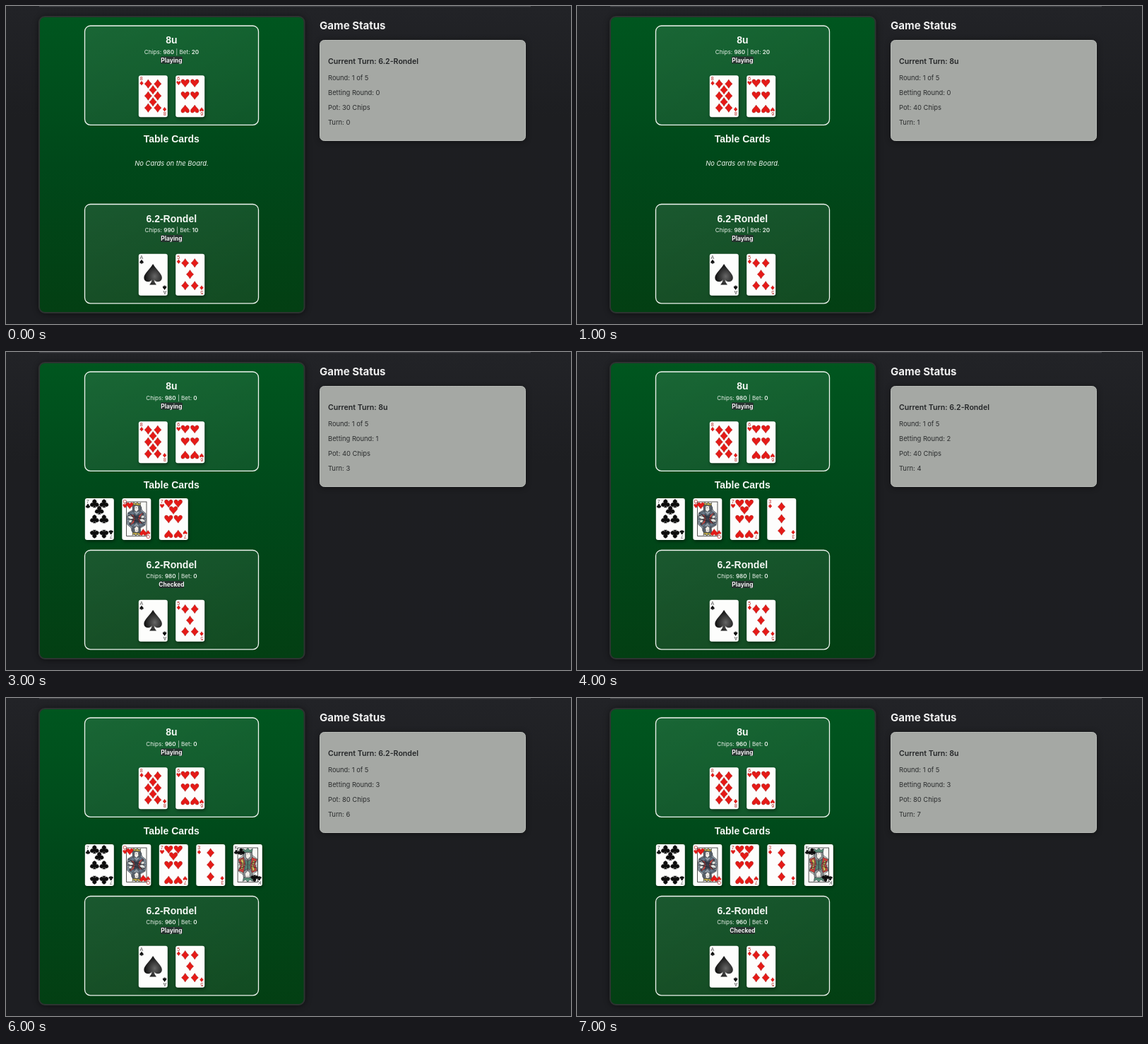
These frames come from a looping animation (800 by 450 pixels, 8 s). An HTML page:

```html
<!DOCTYPE html>
<html lang="en">
<head>
<meta charset="utf-8">
<title>Card table</title>
<style>
html, body { margin: 0; width: 100%; height: 100%; overflow: hidden; background: #1e1f23; }
svg { display: block; width: 100vw; height: 100vh; }
text { font-family: Inter, "Open Sans", sans-serif; white-space: pre; }
.head { font: bold 14px "Liberation Sans", Arial, sans-serif; fill: #f4f8f4; text-anchor: middle; }
.chips { font-size: 8.15px; fill: #e6efe7; text-anchor: middle; }
.chips tspan { font-weight: 600; }
.state { font-size: 8.4px; font-weight: 700; fill: #f3f3f3; text-anchor: middle; }
.note { font-size: 9.4px; font-style: italic; fill: #eef4ee; text-anchor: middle; }
.info { font-size: 9.4px; fill: #2b2d2e; }
.turn { font-size: 10.6px; font-weight: 600; fill: #242628; }
.rank { font: 7px "Liberation Sans", Arial, sans-serif; text-anchor: middle; }
.card { filter: drop-shadow(1px 2px 2px rgba(0, 0, 0, .45)); }
</style>
</head>
<body>
<svg id="stage" viewBox="0 0 800 450">
  <defs>
    <linearGradient id="page" x2="0" y2="1"><stop stop-color="#222327"/><stop offset=".35" stop-color="#1d1e21"/><stop offset="1" stop-color="#1d1e22"/></linearGradient>
    <linearGradient id="felt" x2="0" y2="1"><stop stop-color="#00561f"/><stop offset=".5" stop-color="#00481a"/><stop offset="1" stop-color="#033f13"/></linearGradient>
    <linearGradient id="seat" x2="1" y2="1"><stop stop-color="#fff" stop-opacity=".1"/><stop offset="1" stop-color="#fff" stop-opacity=".06"/></linearGradient>
    <radialGradient id="ink" cx=".6" cy=".6" r=".6"><stop stop-color="#666"/><stop offset="1" stop-color="#0b0b0b"/></radialGradient>
    <filter id="soft" x="-10%" y="-10%" width="120%" height="120%"><feGaussianBlur stdDeviation="4"/></filter>
    <clipPath id="half"><rect x="-14" y="-24.5" width="28" height="24.5"/></clipPath>
  </defs>
  <rect width="800" height="450" fill="url(#page)"/>
  <rect x="47" width="696" height="1.3" fill="#414247"/>
  <rect x="46" y="15" width="378" height="421" rx="10" fill="#000" opacity=".5" filter="url(#soft)"/>
  <rect x="47" y="15" width="375.5" height="419" rx="8" fill="url(#felt)" stroke="#2d3331" stroke-width="2"/>
  <text class="head" x="234.3" y="193.3">Table Cards</text>
  <text class="note" id="note" x="234.5" y="225.7">No Cards on the Board.</text>
  <g id="seats"></g>
  <g id="cards"></g>
  <text x="444" y="33.3" font-size="15" font-weight="700" fill="#efefef">Game Status</text>
  <rect x="444" y="49" width="292" height="143" rx="6" fill="#000" opacity=".4" filter="url(#soft)"/>
  <rect x="444.5" y="48.5" width="291" height="142" rx="6" fill="#a5a8a4" stroke="#b7bab6"/>
  <g id="panel"></g>
</svg>
<script>
const NAMES = ["8u", "6.2-Rondel"];
const STEP = 1000;
// turn, betting round, pot, [chips, bet] of each seat, second seat's state, board cards
const STEPS = [
  [1, 0, 30, [980, 20], [990, 10], "Playing", 0],
  [0, 0, 40, [980, 20], [980, 20], "Playing", 0],
  [1, 1, 40, [980, 0], [980, 0], "Playing", 3],
  [0, 1, 40, [980, 0], [980, 0], "Checked", 3],
  [1, 2, 40, [980, 0], [980, 0], "Playing", 4],
  [0, 2, 60, [980, 0], [960, 20], "Playing", 4],
  [1, 3, 80, [960, 0], [960, 0], "Playing", 5],
  [0, 3, 80, [960, 0], [960, 0], "Checked", 5]
];

const SUITS = {
  D: "M0-6.2Q2-2.6 5.2 0Q2 2.6 0 6.2Q-2 2.6-5.2 0Q-2-2.6 0-6.2Z",
  H: "M0 5.6C-2 2-5.8 0-5.8-2.7C-5.8-6.2-1-6.4 0-2.6C1-6.4 5.8-6.2 5.8-2.7C5.8 0 2 2 0 5.6Z",
  S: "M0-6C2-2.5 5.2-.5 5.2 2C5.2 4.8 1.5 5 .6 3Q.8 5 2 6H-2Q-.8 5-.6 3C-1.5 5-5.2 4.8-5.2 2C-5.2-.5-2-2.5 0-6Z",
  C: "M-1.7-.7A2.8 2.8 0 1 1 1.7-.7A2.8 2.8 0 1 1 .7 2.8Q.9 4.8 2.2 5.6H-2.2Q-.9 4.8-.7 2.8A2.8 2.8 0 1 1-1.7-.7Z"
};
const isRed = suit => "DH".includes(suit);

function pip(suit, x, y, size = 1, turn = y > 31) {
  const paint = isRed(suit) ? 'fill="#e51a17" stroke="#8d1512"' : 'fill="#0c0c0c" stroke="#222"';
  return `<path d="${SUITS[suit]}" ${paint} stroke-width=".4" transform="translate(${x} ${y}) rotate(${turn ? 180 : 0}) scale(${size})"/>`;
}

const row = y => [[13.5, y], [27, y]];
const PIPS = {
  3: [[20.3, 12], [20.3, 29], [20.3, 46]],
  5: [...row(13), [20.3, 29], ...row(45)],
  6: [...row(11), ...row(28.5), ...row(47.5)],
  7: [...row(7.5), [20.3, 17], ...row(29.5), ...row(50.5)],
  8: [...row(12), [20.3, 20.5], ...row(29), [20.3, 37.5], ...row(46)]
};

const shape = (d, fill) => `<path d="${d}" fill="${fill}" stroke="#2c2f38" stroke-width=".6"/>`;
const FIGURES = {
  Q: shape("M-14 0L-12-9-5-13-5-20 5-20 8-12 13-8 14 0Z", "#8b98a3") +
    shape("M-5-11L-6-19-3-22 4-22 7-16 5-11Z", "#59636d") +
    shape("M-3-12V-18Q0-20 3-18V-13L0-10Z", "#f2eee8") +
    shape("M-5-20L-4-24-1-21 1-24 3-21 6-23 5-19Z", "#c9b24a") +
    shape("M-12-8L-5-11 0-5 6-11 11-7 3 0H-4Z", "#697989") +
    shape("M-8-7L0-3 9-9 6 0H-5Z", "#c84540") +
    shape("M-13-3L-8-6-4-1-8 1Z M7-6L12-4 9 0 5-2Z", "#e2e4df") +
    shape("M-4-7L0-4 4-7 2 0H-2Z", "#3b4452") +
    '<path d="M-12-5L13 0M-10-8L-2 0M10-8L4 0M-1-16h1M2-16h1" stroke="#20242c" stroke-width=".8"/>',
  K: shape("M-14 0L-13-9-6-14 6-14 13-9 14 0Z", "#dadbd2") +
    shape("M-6-9L-7-18 6-18 7-9 0-6Z", "#8e9597") +
    shape("M-3-11V-18H4V-12L0-8Z", "#f2eee8") +
    shape("M-6-18L-7-23-3-21 0-24 3-21 7-23 6-18Z", "#5a8f79") +
    shape("M-13-8L-6-11-3 0H-11Z M13-8L6-11 4 0H10Z", "#d3403b") +
    shape("M-4-7L0-5 5-8 3 0H-3Z", "#568574") +
    shape("M-10-7L-7-9-5-1-8 0Z M8-7L10-5 8 0 6-1Z", "#d6bd55") +
    '<path d="M-13-4L-5-2M12-5L4-2M0-8V0M-1-16h1M2-16h1" stroke="#22272b" stroke-width=".8"/>'
};

function face(rank, suit) {
  const half = `<g clip-path="url(#half)">${FIGURES[rank]}</g>`;
  return '<rect x="6.3" y="5" width="28.4" height="48.6" fill="#fbfbf8" stroke="#2a2a2a" stroke-width=".8"/>' +
    `<g transform="translate(20.5 29.3)">${half}<g transform="rotate(180)">${half}</g></g>` +
    pip(suit, 11, 10.5, .82) + pip(suit, 30, 48, .82);
}

function card(code, x, y, id = "") {
  const [rank, suit] = code;
  const corner = `<text class="rank" x="4" y="7" fill="${isRed(suit) ? "#b5221e" : "#555"}">${rank}</text>` +
    pip(suit, 4.2, 11, .5);
  const body = rank === "A"
    ? `<path d="${SUITS.S}" fill="url(#ink)" transform="translate(20.3 29) scale(2.45)"/>`
    : FIGURES[rank] ? face(rank, suit) : PIPS[rank].map(p => pip(suit, ...p)).join("");
  return `<g class="card" ${id && `id="${id}"`} transform="translate(${x} ${y})">` +
    '<rect width="41" height="59" rx="3" fill="#fdfdfc"/>' + body + corner +
    `<g transform="rotate(180 20.5 29.5)">${corner}</g></g>`;
}

const $ = id => document.getElementById(id);

$("seats").innerHTML = NAMES.map((name, i) => {
  const y = 28 + i * 252.5;
  return `<rect x="111.5" y="${y}" width="246" height="140.3" rx="8" fill="url(#seat)" stroke="#f0f5f0" stroke-width="1.3"/>
    <text class="head" x="234.3" y="${y + 25}">${name}</text>
    <text class="chips" id="chips${i}" x="234.5" y="${y + 39.5}"></text>
    <rect id="tag${i}" y="${y + 43.5}" height="10" rx="1.5" fill="#26332f"/>
    <text class="state" id="state${i}" x="234.4" y="${y + 51.6}"></text>`;
}).join("");

const BOARD = ["7C", "QH", "7H", "3D", "KC"];
$("cards").innerHTML =
  card("8D", 187.8, 98.2) + card("6H", 240.2, 98.2) +
  card("AS", 187.8, 350.7) + card("5D", 240.2, 350.7) +
  BOARD.map((code, i) => card(code, 111.8 + i * 52.5, 207, "board" + i)).join("");

$("panel").innerHTML = [82, 105, 126, 147, 168].map((y, i) =>
  `<text class="${i ? "info" : "turn"}" id="line${i}" x="456" y="${y}"></text>`).join("");

function show(n) {
  const [turn, round, pot, first, second, state, count] = STEPS[n];
  ["Current Turn: " + NAMES[turn], "Round: 1 of 5", "Betting Round: " + round, `Pot: ${pot} Chips`, "Turn: " + n]
    .forEach((line, i) => $("line" + i).textContent = line);
  [first, second].forEach(([chips, bet], i) => {
    $("chips" + i).innerHTML = `Chips: <tspan>${chips}</tspan> | Bet: <tspan>${bet}</tspan>`;
    const label = i ? state : "Playing";
    const width = label === "Checked" ? 35 : 31;
    $("state" + i).textContent = label;
    $("tag" + i).setAttribute("x", 234.4 - width / 2);
    $("tag" + i).setAttribute("width", width);
  });
  BOARD.forEach((_, i) => $("board" + i).style.display = i < count ? "" : "none");
  $("note").style.display = count ? "none" : "";
}

let shown = -1;
function tick() {
  const n = Math.floor(performance.now() / STEP) % STEPS.length;
  if (n !== shown) show(shown = n);
  requestAnimationFrame(tick);
}
tick();
</script>
</body>
</html>
```
